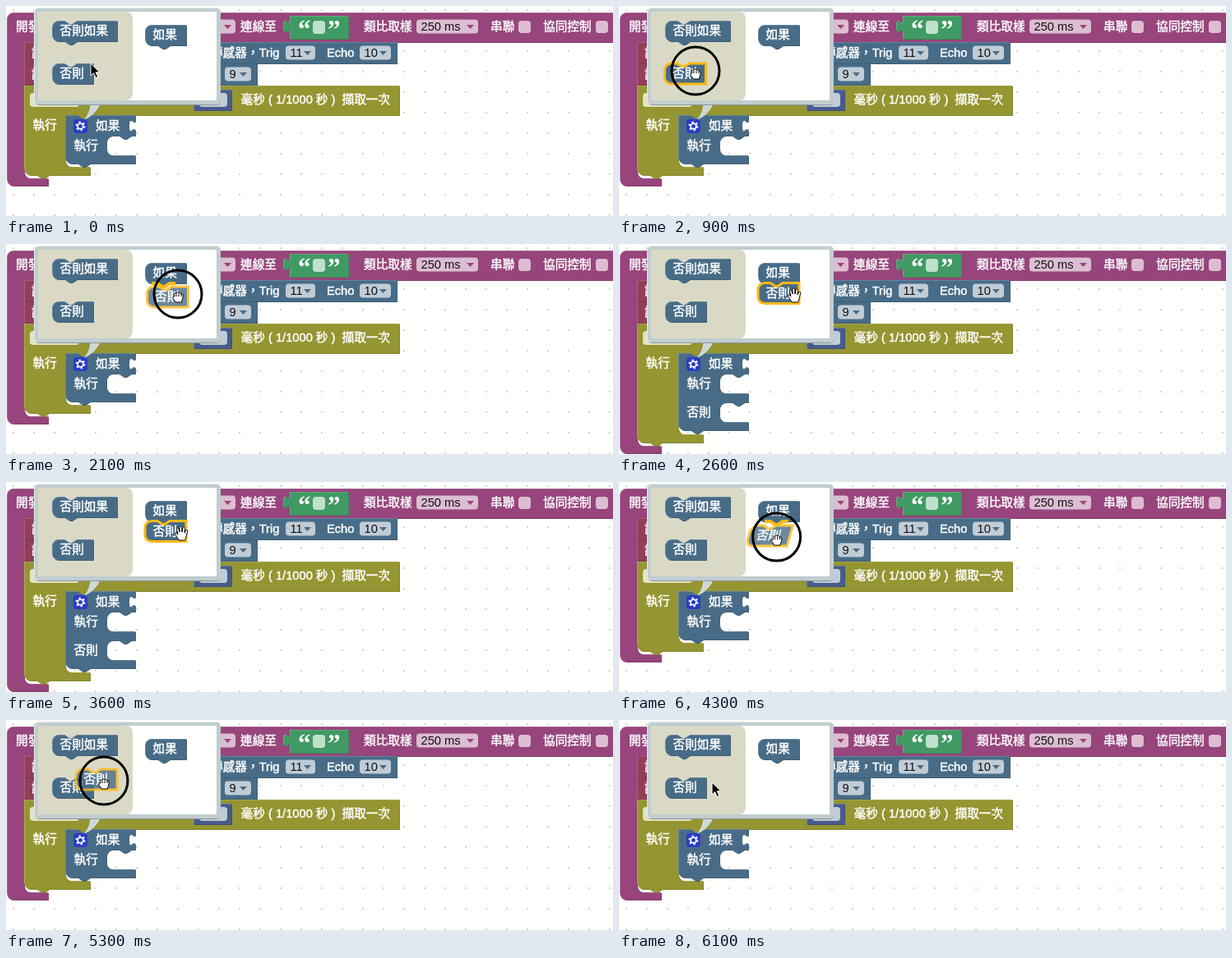
Animation of 738x256 px, one loop 6200 ms. Source, as an HTML page:

```html
<!DOCTYPE html>
<html lang="zh-Hant">
<head>
<meta charset="utf-8">
<style>
  html, body { margin: 0; width: 100%; height: 100%; overflow: hidden; background: #fffffd; }
  svg { display: block; }
  text { font: 500 14.67px "Liberation Sans", "Noto Sans CJK TC", "Noto Sans CJK", sans-serif;
    fill: #fff; stroke: #fff; stroke-width: .45; white-space: pre; }
  text.value { fill: #111; stroke: none; }
  text.quote { font: bold 31px "Liberation Serif", serif; stroke: none; }
</style>
</head>
<body>
<svg id="stage" width="738" height="256" viewBox="0 0 738 256"></svg>
<script>
const MAROON = ['#97457c', '#b57ea4', '#70335c'];
const RED = ['#943f58', '#b37a8a', '#6e2f42'];
const SLATE = ['#486c87', '#819bae', '#345064'];
const BLUE = ['#485c8c', '#8392b2', '#344468'];
const OLIVE = ['#959532', '#b9b96c', '#707024'];
const GREEN = ['#409a63', '#7dbb94', '#2f744a'];

// Path pieces shared by all blocks
const NOTCH = 'H15 l6,4 h3 l6,-4 ';
const BUMP = 'H30 l-6,4 h-3 l-6,-4 ';
const ROUND_TOP = 'M0,8 A8,8 0 0 1 8,0 ';
const ROUND_END = 'H8 a8,8 0 0 1 -8,-8 z';
const SOCKET = 'v5 c0,10 -8,-8 -8,7.5 s8,-2.5 8,7.5 ';
const mouth = (x, height, right) =>
  `H${x + 30} l-6,4 h-3 l-6,-4 H${x + 8} a8,8 0 0 0 -8,8 v${height - 16} a8,8 0 0 0 8,8 H${right} `;
const box = (w, h) => `M0,0 H${w} V${h} H0 z`;

const text = (x, y, s, cls = '') => `<text x="${x}" y="${y + 5.3}" class="${cls}">${s}</text>`;
const rect = (x, y, w, h, fill, r = 4) =>
  `<rect x="${x}" y="${y}" width="${w}" height="${h}" rx="${r}" fill="${fill}"/>`;
const shape = (x, y, d, [fill, light, dark]) => `<g transform="translate(${x} ${y})">
  <path d="${d}" fill="${dark}" transform="translate(1 1)"/><path d="${d}" fill="${light}"/>
  <path d="${d}" fill="${fill}" transform="translate(.6 .6)"/></g>`;
const dropdown = (x, y, w, s, fill, arrow) => rect(x, y - 8.5, w, 17, fill) + text(x + 5.5, y, s, 'value') +
  `<path d="M${x + w - 14},${y - 2} h9 l-4.5,5 z" fill="${arrow}"/>`;

const smallPath = (w, notch, bump) =>
  ROUND_TOP + (notch ? NOTCH : '') + `H${w} V25 ` + (bump ? BUMP : '') + ROUND_END;
const ELSE_PATH = smallPath(50, true, false);
const small = (x, y, w, label, notch, bump) =>
  shape(x, y, smallPath(w, notch, bump), SLATE) + text(x + 9.5, y + 12, label);

function workspace(hasElse) {
  const grow = hasElse ? 36 : 0;
  const maroon = ROUND_TOP + 'H760 V36 ' + mouth(21, 166 + grow, 50) + 'v9 ' + ROUND_END;
  const olive = `M0,0 ${NOTCH}H456 V36 ` + mouth(50, 63 + grow, 80) + `v10 ${BUMP}${ROUND_END}`;
  const ifBlock = `M0,0 ${NOTCH}H85 ${SOCKET}V25 ` + mouth(50, 24, 85) +
    (hasElse ? 'v11 ' + mouth(50, 24, 85) : '') + `v10 ${BUMP}${ROUND_END}`;
  const row = `M0,0 ${NOTCH}H200 V26 ${BUMP}H0 z`;
  const pink = '#dcbdd2', pale = '#c0ccd6';
  return shape(1, 8, maroon, MAROON) +
    text(12, 25, '開發') + dropdown(200, 25, 79, '', pink, MAROON[0]) + text(285, 25, '連線至') +
    shape(345, 12, 'M0,0 H71 V28 H0 V20 c0,-10 -8,8 -8,-7.5 s8,2.5 8,-7.5 z', GREEN) +
    text(355, 34, '“', 'quote') + rect(373, 18, 15, 16, '#bfe0cc') + text(391, 34, '”', 'quote') +
    text(435, 25, '類比取樣') + dropdown(499, 25, 75, '250 ms', pink, MAROON[0]) +
    text(589, 25, '串聯') + rect(623, 18, 15, 15, pink) +
    text(653, 25, '協同控制') + rect(717, 18, 15, 15, pink) +
    shape(22, 97, olive, OLIVE) +
    shape(22, 70, row, RED) + shape(22, 44, row, RED) +
    shape(200, 70, box(105, 26), SLATE) + shape(200, 44, box(275, 26), SLATE) +
    text(31, 57, '設定') + text(249, 57, '傳感器，Trig') +
    dropdown(340, 57, 36, '11', pale, SLATE[0]) + text(390, 57, 'Echo') +
    dropdown(430, 57, 38, '10', pale, SLATE[0]) +
    text(31, 83, '設定') + dropdown(266, 83, 32, '9', pale, SLATE[0]) +
    rect(29, 106, 60, 17, '#e3e3c4') +
    shape(228, 102, box(46, 25), BLUE) + rect(235, 106, 34, 17, pale) +
    text(285.5, 114, '毫秒') + text(319, 114, '( 1/1000 秒 )') + text(408.5, 114, '擷取一次') +
    text(32.5, 145, '執行') +
    shape(72, 133, ifBlock, SLATE) +
    rect(82, 138, 17, 17, '#2a3cc4') +
    `<g fill="none" stroke="#fff"><circle cx="90.5" cy="146.5" r="3.4" stroke-width="1.8"/>
     <circle cx="90.5" cy="146.5" r="5" stroke-width="2" stroke-dasharray="2.2 3.04"/></g>` +
    text(109, 146, '如果') + text(82.5, 170, '執行') + (hasElse ? text(82.5, 205, '否則') : '');
}

const bubble = `
  <path d="M103,118 Q103,129 96,138 Q109,132 115,118 z" fill="#ccd8d9" stroke="#e6eeee" stroke-width=".7"/>
  ${rect(35, 3, 226, 118, '#8b9799', 5)}${rect(34, 2, 227, 118, '#e1e9ea', 5)}
  ${rect(35, 3, 226, 117, '#c1cdcf', 5)}${rect(39, 7, 217, 108, '#fffffe', 1)}
  <path d="M39,7 H146 a8,8 0 0 1 8,8 V107 a8,8 0 0 1 -8,8 H39 z" fill="#dad9c6"/>` +
  small(56, 18, 79, '否則如果', true, true) + small(56, 70, 50, '否則', true, false) +
  small(169, 23, 50, '如果', false, true);

document.getElementById('stage').innerHTML = `
  <defs><pattern id="dots" x="8" y="4" width="25" height="25" patternUnits="userSpaceOnUse">
    <path d="M0,1 h2 M1,0 v2" stroke="#c4c4c4"/></pattern></defs>
  <rect width="738" height="256" fill="url(#dots)"/>
  <g id="short">${workspace(false)}</g><g id="tall">${workspace(true)}</g>
  ${bubble}
  <path id="joint" d="M177,48 h7 l6,4 h3 l6,-4 h7" fill="none" stroke="#fcb913" stroke-width="4"/>
  <g id="piece"><path id="pieceBody" d="${ELSE_PATH}" fill="${SLATE[0]}" stroke="#fcb913" stroke-width="3"/>
    ${text(9.5, 12, '否則')}</g>
  <g id="pointer">
    <circle id="ring" r="29" fill="none" stroke="#000" stroke-width="3"/>
    <path id="arrow" d="M0,0 V15 L3.6,11.8 L6.2,17.5 L8.8,16.3 L6.2,10.8 H11 z" fill="#000" stroke="#fff"/>
    <g fill="#fff" stroke="#000" stroke-linejoin="round">
      <path id="open" d="M-3,12 C-4,9 -8,5 -7.5,3.5 C-7,2 -5,3.5 -4,5 L-5.5,-1.5 C-5.5,-3.5 -3.5,-3.5 -3,-1.5
        L-2,2 V-3.5 C-2,-5.5 .5,-5.5 .7,-3.5 L1,2 L2,-3 C2.5,-5 4.7,-4.5 4.5,-2.5 L4,3 L5.5,0
        C6.5,-1.5 8.2,-.5 7.7,1 C6.5,5 6.5,8 4.5,12 z"/>
      <path id="fist" d="M-3,10 C-4,7 -6.5,6 -6,4 C-5.5,2.5 -4,3 -4,3 C-5.5,-1 -3,-2 -2,-.5 C-1.5,-2.5 .7,-2.5 1,-.7
        C2,-2 3.8,-1.5 4,0 C5.5,-.7 6.3,.5 6.2,2 C6,6 5,7 4.5,10 z M-2,0 v3 M1,0 v3 M4,0 v3"/>
    </g>
  </g>`;

const LOOP = 6200, STEP = 100;
const PRESS = 800, DROP = 2300, GRAB = 4000, SPLIT = 4300, DISCARD = 5500;
// time, pointer x, pointer y
const track = [
  [0, 103, 70], [600, 93, 79], [900, 93, 79], [1600, 209, 61], [DROP, 209, 61], [2600, 213, 59],
  [3600, 213, 59], [GRAB, 203, 66], [5300, 119, 74], [DISCARD, 114, 75], [LOOP, 113, 76]
];

function pointerAt(t) {
  const i = track.findIndex(k => k[0] > t);
  const [t0, x0, y0] = track[i - 1], [t1, x1, y1] = track[i];
  const p = (t - t0) / (t1 - t0), e = p * p * (3 - 2 * p);
  return [x0 + (x1 - x0) * e, y0 + (y1 - y0) * e];
}

const el = id => document.getElementById(id);
const show = (id, on) => el(id).setAttribute('display', on ? 'inline' : 'none');
const within = (t, a, b) => t >= a && t < b;

function draw(t) {
  const [x, y] = pointerAt(t);
  const firstDrag = within(t, PRESS, DROP), secondDrag = within(t, SPLIT, DISCARD);
  const pressed = firstDrag || within(t, GRAB, DISCARD);
  const hand = within(t, 300, DISCARD + 200);
  const attached = within(t, DROP, SPLIT);

  show('short', !attached);
  show('tall', attached);
  show('joint', within(t, 1500, DROP) || within(t, SPLIT, SPLIT + 100));
  show('ring', pressed);
  show('arrow', !hand);
  show('open', hand && !pressed);
  show('fist', hand && pressed);
  el('pointer').setAttribute('transform', `translate(${x} ${y})`);

  let px = 169, py = 47.5, skew = 0;
  if (firstDrag) [px, py] = [x - 37.5, y - 9];
  if (secondDrag) {
    [px, py] = [x - 34, y - 14];
    const p = Math.min((t - SPLIT) / 200, 1);
    skew = -16 * Math.cos(3 * Math.PI * p) * (1 - p);
  }
  show('piece', within(t, PRESS, DISCARD));
  el('piece').setAttribute('transform', `translate(${px} ${py + 13}) skewX(${skew}) translate(0 -13)`);
  el('pieceBody').setAttribute('opacity', firstDrag && t > 900 || secondDrag ? .8 : 1);
}

function frame() {
  draw(Math.floor(performance.now() % LOOP / STEP) * STEP);
  requestAnimationFrame(frame);
}
frame();
</script>
</body>
</html>
```
